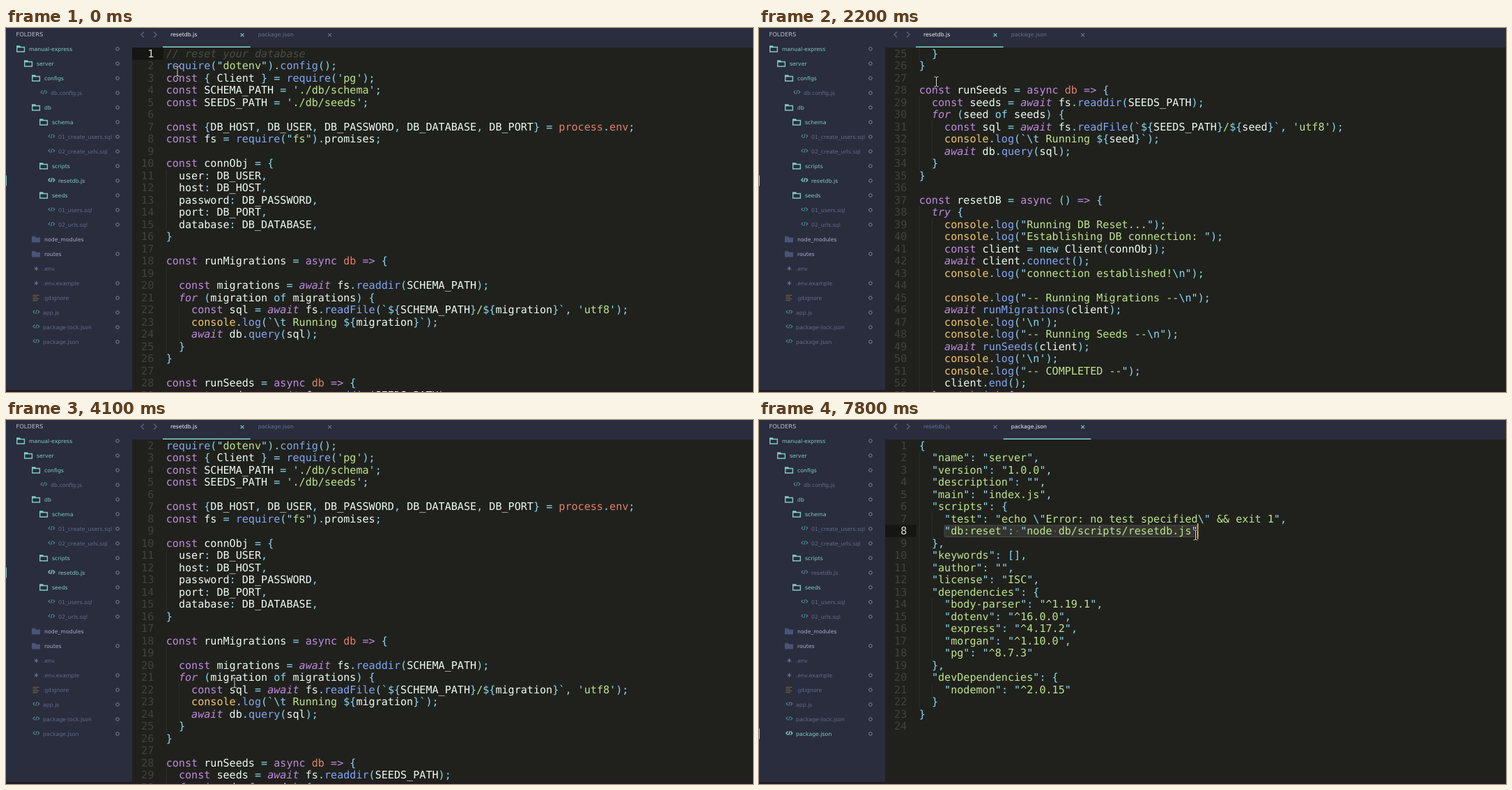
An HTML page for the animation above (8 s loop, 1072 px wide and 522 px high).

```html
<!DOCTYPE html>
<html lang="en">
<head>
<meta charset="utf-8">
<title>Editor</title>
<style>
html, body { margin: 0; width: 100%; height: 100%; overflow: hidden; background: #20211c; }
svg { display: block; width: 1072px; height: 522px; text-rendering: geometricPrecision; }
.ui { font: 7.8px "DejaVu Sans", sans-serif; }
.code { font: 15.1px "DejaVu Sans Mono", monospace; }
.tx { fill: #eefaf6; } .pn { fill: #86d9f5; } .st { fill: #bfe48b; }
.kw, .ki { fill: #c08be2; } .fn { fill: #80a7f7; } .or { fill: #e0806a; }
.yl { fill: #f3c46a; } .cm { fill: #4b4c48; }
.ki, .cm { font-style: italic; }
.num { fill: #41423e; text-anchor: end; }
.num.on { fill: #dcdcd6; }
.guide { fill: #2e2f2a; }
.open { fill: #80cbc4; } .closed { fill: #a6accd; } .file { fill: #646b8f; }
.line { fill: none; stroke-width: 1.4; }
.open .line { stroke: #80cbc4; } .file .line { stroke: #4b7f88; stroke-width: 1.2; }
.tab { fill: #6a7192; stroke: #6a7192; }
.tab.on { fill: #f0f3f8; stroke: #80cbc4; }
.tab text { stroke: none; }
</style>
</head>
<body>
<script type="text/plain" id="js">
// reset your database
require("dotenv").config();
const { Client } = require('pg');
const SCHEMA_PATH = './db/schema';
const SEEDS_PATH = './db/seeds';

const {DB_HOST, DB_USER, DB_PASSWORD, DB_DATABASE, DB_PORT} = process.env;
const fs = require("fs").promises;

const connObj = {
  user: DB_USER,
  host: DB_HOST,
  password: DB_PASSWORD,
  port: DB_PORT,
  database: DB_DATABASE,
}

const runMigrations = async db => {

  const migrations = await fs.readdir(SCHEMA_PATH);
  for (migration of migrations) {
    const sql = await fs.readFile(`${SCHEMA_PATH}/${migration}`, 'utf8');
    console.log(`\t Running ${migration}`);
    await db.query(sql);
  }
}

const runSeeds = async db => {
  const seeds = await fs.readdir(SEEDS_PATH);
  for (seed of seeds) {
    const sql = await fs.readFile(`${SEEDS_PATH}/${seed}`, 'utf8');
    console.log(`\t Running ${seed}`);
    await db.query(sql);
  }
}

const resetDB = async () => {
  try {
    console.log("Running DB Reset...");
    console.log("Establishing DB connection: ");
    const client = new Client(connObj);
    await client.connect();
    console.log("connection established!\n");

    console.log("-- Running Migrations --\n");
    await runMigrations(client);
    console.log('\n');
    console.log("-- Running Seeds --\n");
    await runSeeds(client);
    console.log('\n');
    console.log("-- COMPLETED --");
    client.end();
  } catch (e) {
    console.log("ERROR OCCURED:\n", e);
    client.end();
  }
}

resetDB();
</script>
<script type="text/plain" id="json">
{
  "name": "server",
  "version": "1.0.0",
  "description": "",
  "main": "index.js",
  "scripts": {
    "test": "echo \"Error: no test specified\" && exit 1",
    "db:reset": "node db/scripts/resetdb.js"
  },
  "keywords": [],
  "author": "",
  "license": "ISC",
  "dependencies": {
    "body-parser": "^1.19.1",
    "dotenv": "^16.0.0",
    "express": "^4.17.2",
    "morgan": "^1.10.0",
    "pg": "^8.7.3"
  },
  "devDependencies": {
    "nodemon": "^2.0.15"
  }
}

</script>
<script type="text/plain" id="tree">
manual-express
 server
  configs
   db.config.js
  db
   schema
    01_create_users.sql
    02_create_urls.sql
   scripts
    resetdb.js
   seeds
    01_users.sql
    02_urls.sql
  node_modules
  routes
  .env
  .env.example
  .gitignore
  app.js
  package-lock.json
  package.json
</script>
<svg viewBox="0 0 1072 522">
  <defs><clipPath id="pane"><rect x="181" y="28" width="891" height="494"/></clipPath></defs>
  <rect width="1072" height="522" fill="#20211c"/>
  <rect y="519" width="1072" height="3" fill="#251b22"/>
  <g id="editor" class="code" clip-path="url(#pane)"></g>
  <rect width="181" height="519" fill="#292d3d"/>
  <rect width="1072" height="28" fill="#292d3d"/>
  <g id="ui" class="ui"></g>
  <g id="mouse" fill="none">
    <g id="beam">
      <path d="M-3-7H-1L0-6L1-7H3M0-6V6M-3 7H-1L0 6L1 7H3" stroke="#111" stroke-width="2.6"/>
      <path d="M-3-7H-1L0-6L1-7H3M0-6V6M-3 7H-1L0 6L1 7H3" stroke="#e6e6e2"/>
    </g>
    <path id="arrow" d="M0 0V13L3 10L5.2 15L7.2 14L5 9.3H9.2Z" fill="#111" stroke="#eee" stroke-width=".8"/>
  </g>
</svg>
<script>
const CH = 9.091, LH = 17.5, LEFT = 229.7, TOP = 28, ROW = 21, LOOP = 8000;
const $ = id => document.getElementById(id);
const clamp = (v, lo, hi) => Math.min(hi, Math.max(lo, v));
const readLines = id => $(id).textContent.slice(1, -1).split('\n');

function add(parent, tag, attrs = {}, text) {
  const el = document.createElementNS('http://www.w3.org/2000/svg', tag);
  for (const k in attrs) el.setAttribute(k, attrs[k]);
  if (text !== undefined) el.textContent = text;
  parent.append(el);
  return el;
}
const show = (el, on) => el.setAttribute('display', on ? 'inline' : 'none');
const colX = col => LEFT + col * CH;
const lineY = n => TOP + (n - 1) * LH;

const TOKEN = /(?<cm>\/\/.*)|(?<q>["'`])(?<body>(?:\\.|(?!\k<q>).)*)\k<q>|(?<kw>=>|\b(?:const|async)\b)|(?<ki>\b(?:await|for|try|catch)\b)|(?<yl>\bconsole\b)|(?<or>\b(?:process|env)\b|\bdb(?= =>))|(?<pn>\b(?:of|new)\b|[^\w\s])|(?<fn>(?<!new )\b\w+(?=\())|(?<tx>\w+)/g;
const PIECE = /(\\.)|(\$\{)(\w+)(\})|([^\\$]+)/g;

// Calls put(class, text, column) for every coloured part of a line.
function tokenize(src, put) {
  for (const m of src.matchAll(TOKEN)) {
    const g = m.groups;
    if (!g.q) {
      const cls = Object.keys(g).find(k => g[k] !== undefined);
      put(cls, m[0], m.index);
      continue;
    }
    const start = m.index + 1;
    put('pn', g.q, m.index);
    for (const p of g.body.matchAll(PIECE)) {
      const col = start + p.index;
      if (p[1]) put('pn', p[1], col);
      else if (p[5]) put('st', p[5], col);
      else {
        put('pn', '${', col);
        put('tx', p[3], col + 2);
        put('pn', '}', col + 2 + p[3].length);
      }
    }
    put('pn', g.q, start + g.body.length);
  }
}

function makeDoc(id) {
  const lines = readLines(id);
  const root = add($('editor'), 'g');
  const bar = add(root, 'rect', { x: 181, width: 45, height: LH, fill: '#151612' });
  const back = add(root, 'g');
  const indent = i => lines[i] ? lines[i].search(/\S/) : 0;
  const nums = lines.map((src, i) => {
    const top = lineY(i + 1), base = top + 13.9;
    const depth = src ? indent(i) : Math.max(indent(i - 1), indent(i + 1));
    for (let c = 0; c < depth; c += 2)
      add(root, 'rect', { class: 'guide', x: colX(c), y: top, width: 1, height: LH });
    tokenize(src, (cls, text, col) => {
      for (const w of text.matchAll(/\S+/g))
        add(root, 'text', { class: cls, x: colX(col + w.index), y: base }, w[0]);
    });
    return add(root, 'text', { class: 'num', x: 212.3, y: base }, i + 1);
  });
  const activate = n => {
    bar.setAttribute('y', lineY(n));
    nums.forEach((el, i) => el.classList.toggle('on', i + 1 === n));
  };
  // The tiny skew keeps half-pixel baselines from snapping.
  const scroll = n => root.setAttribute('transform', `translate(0 ${-n * LH}) skewY(.002)`);
  return { root, back, activate, scroll };
}

const js = makeDoc('js'), json = makeDoc('json');
js.activate(1);
json.scroll(0);

// The dragged range on the "db:reset" line
const FIRST = 4, LAST = 44;
const selection = add(json.back, 'rect', {
  x: colX(FIRST), y: lineY(8) + .5, height: LH - 1, rx: 2, fill: '#343530', stroke: '#4a4b46'
});
const dots = [15, 21].map(col => ({
  col, el: add(json.root, 'circle', { cx: colX(col + .5), cy: lineY(8) + 9, r: .9, fill: '#777972' })
}));
const caret = add(json.root, 'rect', { width: 1.7, height: 22.5, fill: '#f0b950' });

const ui = $('ui');
const icons = {
  open: { d: 'M.7-4H4.6L5.8-2.5H11.4V4H.7ZM.7-2.5H6', class: 'line' },
  closed: { d: 'M0-4.2H4.8L6.2-2.6H12V4.6H0Z', fill: '#4c5377' },
  file: { d: 'M3.4-3.4L1-1L3.4 1.4M7.4-3.4L9.8-1L7.4 1.4M6.2-3.8L4.6 1.8', class: 'line' },
  star: { d: 'M5.5-3V3M2.9-1.5L8.1 1.5M8.1-1.5L2.9 1.5', fill: 'none', stroke: '#6b7291' },
  list: { d: 'M.5-3.7H9.5M.5-1.2H7M.5 1.3H9.5M.5 3.8H7', fill: 'none', stroke: '#80683f' }
};
function kindOf(name) {
  if (/^(node_modules|routes)$/.test(name)) return 'closed';
  if (name.startsWith('.env')) return 'star';
  if (name.startsWith('.git')) return 'list';
  return name.includes('.') ? 'file' : 'open';
}
const rowY = i => 30 + ROW * i;

add(ui, 'text', { x: 14.4, y: 12.2, fill: '#b9bfd2', style: 'font-size:8.4px' }, 'FOLDERS');
const rows = readLines('tree').map((src, i) => {
  const name = src.trim(), kind = kindOf(name), y = rowY(i);
  const folder = kind === 'open' || kind === 'closed';
  const x = 15 + 11 * (src.length - name.length) + (folder ? 0 : 1);
  const g = add(ui, 'g', { class: folder ? kind : 'file' });
  add(g, 'path', { ...icons[kind], transform: `translate(${x} ${y})` });
  add(g, 'text', { x: x + (folder ? 18 : 15), y: y + 2.9 }, name);
  if (!/^(node_modules|\.env)$/.test(name))
    add(g, 'circle', { cx: 160, cy: y, r: 2.3, fill: 'none', stroke: '#868ca3', 'stroke-width': .9 });
  return { name, g };
});
const mark = add(ui, 'rect', { width: 1, height: 15, fill: '#80cbc4' });

add(ui, 'path', { d: 'M198 5.5L194 9.5L198 13.5M212 5.5L216 9.5L212 13.5', fill: 'none', stroke: '#5c6382', 'stroke-width': 1.3 });
const tabs = ['resetdb.js', 'package.json'].map((name, i) => {
  const x = 225 + 125.7 * i;
  const g = add(ui, 'g', { class: 'tab' });
  add(g, 'text', { x: x + 11, y: 12.2 }, name);
  add(g, 'path', { d: `M${x + 111.6} 7.6l4.8 4.8m0-4.8l-4.8 4.8`, 'stroke-width': 1.1 });
  const under = add(ui, 'rect', { x, y: 26.4, width: 125.7, height: 1.6, fill: '#80cbc4' });
  return { name, g, under };
});

// Progress from 0 to 1 between two times
const sweep = (t, from, to) => clamp((t - from) / (to - from), 0, 1);

// Whole lines scrolled: three wheel runs down, then back to the top
const scrolledLines = t => Math.round(
  12 * sweep(t, 1000, 1600) + 12 * sweep(t, 1700, 2200) +
  15 * sweep(t, 2300, 2900) + sweep(t, 2900, 3000) -
  39 * sweep(t, 3600, 4100) - sweep(t, 4200, 4300));

// Mouse glides: start, end, x, y
const glides = [
  [0, 0, 246, 62], [100, 600, 252, 42], [1000, 1600, 259, 66], [1700, 2200, 254.5, 77],
  [2300, 2900, 300, 281], [2900, 3400, 333, 386], [3600, 4100, 328, 377],
  [4200, 5400, 391, 11], [5900, 6300, 369, 217], [6300, 6900, 264, 167], [7000, 7800, 626.5, 165]
];
const mouseAt = t => glides.reduce(([x, y], [from, to, nx, ny]) => {
  const u = to ? sweep(t, from, to) : 1;
  return [x + (nx - x) * u, y + (ny - y) * u];
}, [0, 0]);

function render(t) {
  const second = t >= 5600, clicked = t >= 6900, dragging = t >= 7100;
  const [x, y] = mouseAt(t);

  show(js.root, !second);
  show(json.root, second);
  js.scroll(scrolledLines(t));
  json.activate(clicked ? 8 : 24);

  const col = clamp(Math.round((x - LEFT) / CH), FIRST, LAST);
  caret.setAttribute('x', colX(clicked ? col : 0) - .9);
  caret.setAttribute('y', lineY(clicked ? 8 : 24) - 2.3);
  show(selection, dragging);
  selection.setAttribute('width', (col - FIRST) * CH);
  for (const dot of dots) show(dot.el, dragging && col > dot.col);

  const current = tabs[second ? 1 : 0];
  for (const tab of tabs) tab.g.classList.toggle('on', tab === current);
  show(tabs[0].under, !second);
  tabs[1].under.setAttribute('opacity', second ? 1 : .9 * sweep(t, 5100, 5400));

  rows.forEach(({ name, g }, i) => {
    if (!tabs.some(tab => tab.name === name)) return;
    const on = name === current.name;
    g.setAttribute('class', on ? 'open' : 'file');
    if (on) mark.setAttribute('y', rowY(i) - 7.5);
  });

  const onTabs = y < TOP;
  show($('arrow'), onTabs);
  show($('beam'), !onTabs);
  $('mouse').setAttribute('transform', `translate(${x} ${y})`);
}

const start = performance.now();
function tick() {
  const t = (performance.now() - start) % LOOP;
  render(Math.floor(t / 100) * 100);
  requestAnimationFrame(tick);
}
tick();
</script>
</body>
</html>
```
